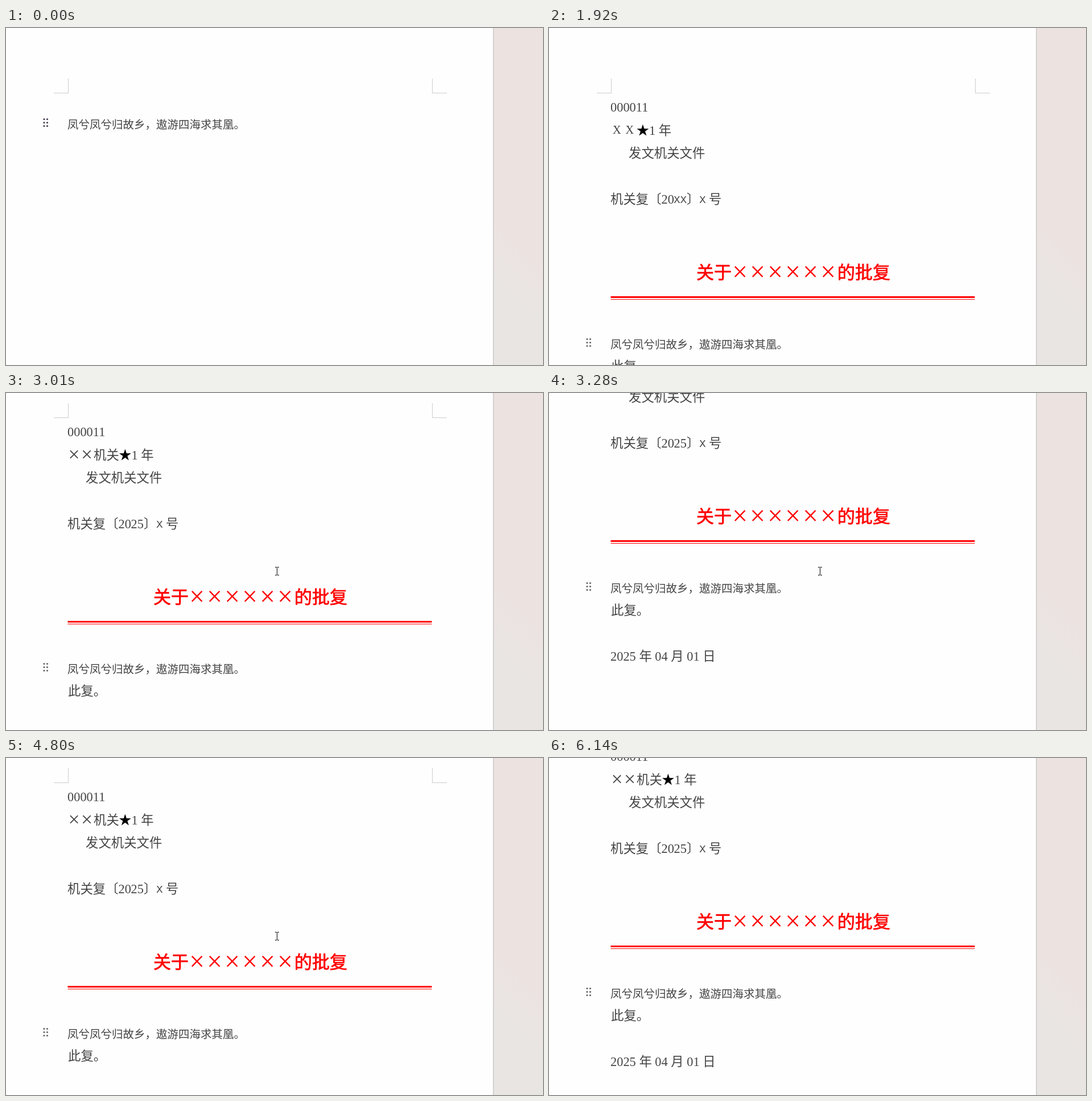
An HTML page with a canvas for the animation above (6540 ms loop, 944 by 593 pixels).

```html
<!DOCTYPE html>
<html lang="zh-CN">
<head>
<meta charset="utf-8">
<style>
html, body { margin: 0; width: 100%; height: 100%; overflow: hidden; background: #fefefe; }
canvas { display: block; }
</style>
</head>
<body>
<canvas id="stage" width="944" height="593"></canvas>
<script>
const ctx = document.getElementById('stage').getContext('2d');
const LOOP = 6540, NOTCH = 71;
const INK = '#444', RED = '#f00';
const SERIF = '"Liberation Serif", "Noto Sans CJK SC", "Noto Sans CJK", serif';
const SANS = '"Noto Sans CJK SC", "Noto Sans CJK", sans-serif';
const MONO = '"Liberation Mono", monospace';

// [start time, wheel notches]
const scrolls = [[0, 0], [3010, 1], [3080, 2], [3280, 3], [4070, 1], [4140, 0], [4800, 1], [4870, 2]];
// [time, x, y]
const pointer = [[2270, 824, 325], [2410, 650, 318], [2700, 476, 313], [4870, 476, 313],
  [5010, 497, 336], [5430, 647, 410], [6060, 888, 590]];

function rect(x, y, w, h, color) {
  ctx.fillStyle = color;
  ctx.fillRect(x, y, w, h);
}

function text(str, x, y, size = 22.4, color = INK, family = SERIF) {
  ctx.font = `300 ${size}px ${family}`;
  ctx.fillStyle = color;
  ctx.fillText(str, x, y);
}

// Medium weight: regular glyphs with a thin outline
function heading(str, x, y) {
  text(str, x, y, 31, RED, SANS);
  ctx.strokeStyle = RED;
  ctx.lineWidth = .7;
  ctx.strokeText(str, x, y);
}

// One symbol whose ink is centred on (cx, cy) and is w wide
function symbol(ch, cx, cy, w, color = INK, family = SERIF) {
  ctx.font = `300 100px ${family}`;
  const m = ctx.measureText(ch);
  const k = w / (m.actualBoundingBoxLeft + m.actualBoundingBoxRight);
  const dx = (m.actualBoundingBoxRight - m.actualBoundingBoxLeft) / 2 * k;
  const dy = (m.actualBoundingBoxAscent - m.actualBoundingBoxDescent) / 2 * k;
  text(ch, cx - dx, cy + dy, 100 * k, color, family);
}

function poem(y, dotColor) {
  text('凤兮凤兮归故乡，遨游四海求其凰。', 108, y, 19.5);
  ctx.fillStyle = dotColor;
  for (let i = 0; i < 6; i++) {
    ctx.beginPath();
    ctx.arc(67 + i % 2 * 5.5, y - 10.5 + ((i >> 1) - 1) * 6, 1.6, 0, 7);
    ctx.fill();
  }
}

function corners() {
  const c = '#cccccc';
  rect(109, 89, 1, 26, c);
  rect(84, 114, 26, 1, c);
  rect(749, 89, 1, 26, c);
  rect(749, 114, 26, 1, c);
}

function letter(filled) {
  text('000011', 108, 147);

  const shift = filled ? 44.5 : 0;
  for (const x of [119.5, 142]) symbol(filled ? '×' : 'X', x, 179.5, filled ? 15 : 14);
  if (filled) text('机关', 154, 187.5);
  symbol('★', 165 + shift, 179.5, 21, '#000', '"DejaVu Sans", sans-serif');
  text('1 年', 176 + shift, 187.5);

  text('发文机关文件', 140, 228);

  text('机关复〔20', 108, 309);
  if (filled) text('25', 219.5, 309);
  else for (const x of [225, 236.5]) symbol('X', x, 302, 11, INK, MONO);
  text('〕', 242, 309);
  symbol('X', 270, 302, 11, INK, MONO);
  text('号', 281, 309);

  heading('关于', 259, 441);
  for (let i = 0; i < 6; i++) symbol('×', 335.5 + 31 * i, 429.5, 20, RED);
  heading('的批复', 507, 441);
  rect(108.5, 472, 640, 3, RED);
  rect(108.5, 477, 640, 1, RED);

  poem(564, '#666');
  text('此复。', 109, 603);
  text('2025 年 04 月 01 日', 108, 683.5);
}

function margin() {
  const g = ctx.createLinearGradient(920, 400, 870, 450);
  g.addColorStop(0, '#ece3e1');
  g.addColorStop(1, '#e9e5e2');
  rect(857, 0, 87, 593, g);
  rect(856, 0, 1, 593, '#cbc9c8');
  rect(857, 0, 1, 593, '#ddd8d6');
}

function beam(x, y) {
  rect(x, y - 6, 1, 13, '#000');
  for (const dy of [-7, 7]) {
    rect(x - 3, y + dy, 3, 1, '#000');
    rect(x + 1, y + dy, 3, 1, '#000');
  }
}

function arrow(x, y) {
  ctx.save();
  ctx.translate(x + .5, y + .5);
  ctx.fillStyle = '#fff';
  ctx.strokeStyle = '#000';
  ctx.lineWidth = 1;
  const shape = new Path2D('M0 0V16L4 12.5L6.5 18L9 17L6.5 11.5H11.5Z');
  ctx.fill(shape);
  ctx.stroke(shape);
  ctx.restore();
}

function drawPointer(t) {
  if (t >= 390 && t < 460) arrow(941, 559);
  if (t < 2270 || t >= 6140) return;
  const s = Math.floor((t - 40) / 70) * 70 + 40;
  let i = 0;
  while (i < pointer.length - 2 && s >= pointer[i + 1][0]) i++;
  const [t0, x0, y0] = pointer[i], [t1, x1, y1] = pointer[i + 1];
  const p = Math.min(1, Math.max(0, (s - t0) / (t1 - t0)));
  const x = Math.round(x0 + (x1 - x0) * p), y = Math.round(y0 + (y1 - y0) * p);
  (x > 856 ? arrow : beam)(x, y);
}

function draw(now) {
  const t = now % LOOP;
  const notches = scrolls.filter(s => s[0] <= t).pop()[1];
  rect(0, 0, 944, 593, '#fefefe');
  ctx.save();
  ctx.translate(0, -NOTCH * notches);
  corners();
  if (t < 1920) poem(177, '#453c4c');
  else letter(t >= 2200);
  ctx.restore();
  margin();
  drawPointer(t);
}

const start = performance.now();
function tick() {
  draw(performance.now() - start);
  requestAnimationFrame(tick);
}
tick();
</script>
</body>
</html>
```
